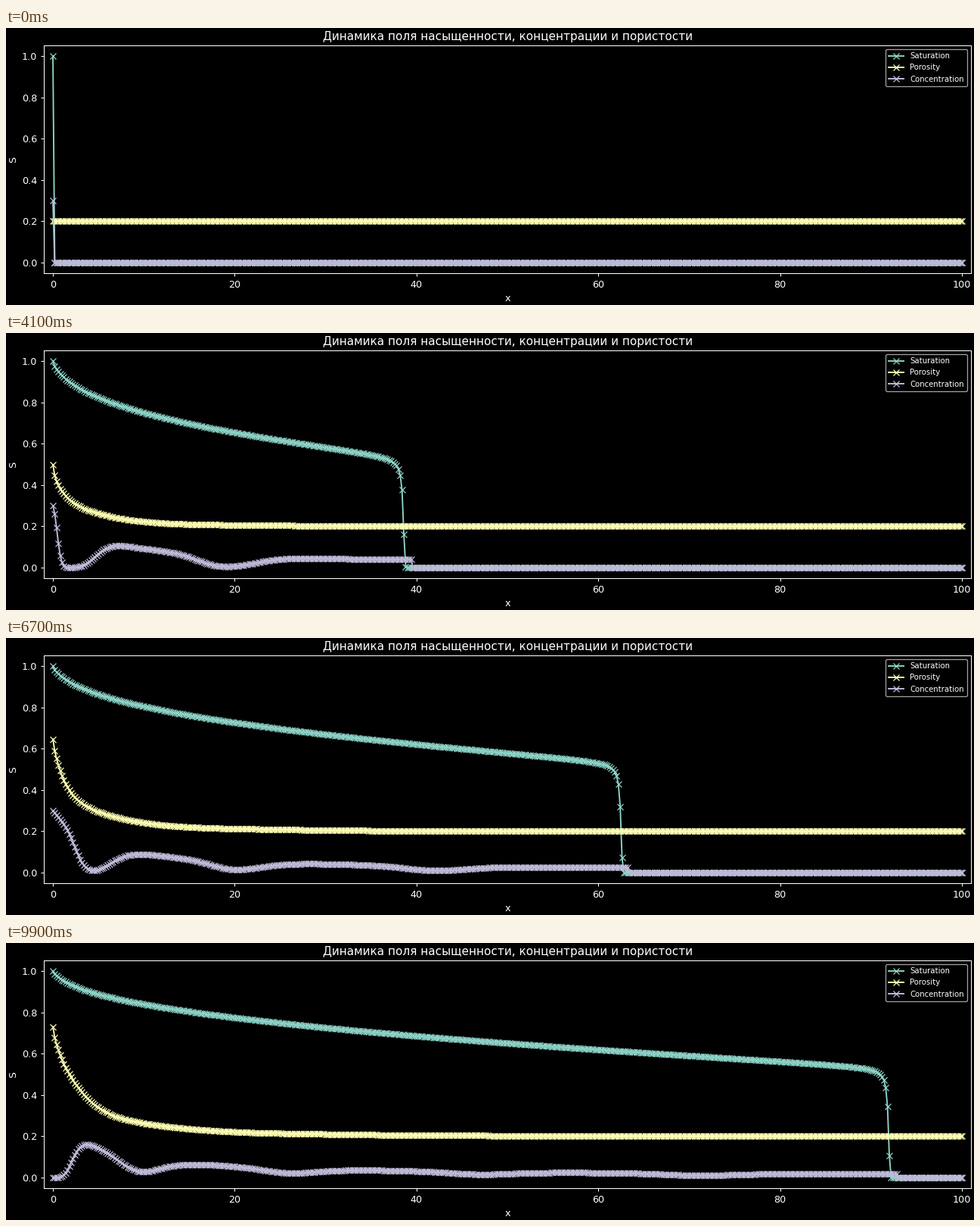
These frames come from a looping animation (1280x366 px, 10 s). A matplotlib script:

```python
import numpy as np
import matplotlib.pyplot as plt
from matplotlib.animation import FuncAnimation

WIDTH, HEIGHT = 1280, 366
DPI = WIDTH / 14
FRAMES, INTERVAL = 100, 100

# Two-phase flow with acid injected in pulses; time is measured in frames.
DX = 0.2
STEPS = 16             # time steps per frame
LEAD = 6               # steps already done when the first moving frame is shown
FLUX = 0.128           # total flow rate
MOBILITY = 0.4         # mobility ratio of the two phases
PULSE = 9.98           # length of an injection and of the pause after it
INLET = 0.3            # acid concentration while injecting
GROWTH = 0.2417        # pore growth rate
CONSUMPTION = 0.128    # acid consumption rate
DRY = 1e-60            # below this saturation a cell holds no acid

x = np.arange(501) * DX


def fractional_flow(s):
    return s**2 / (s**2 + MOBILITY * (1 - s)**2)


def advance(s, phi, c, step):
    """One explicit upwind step for saturation, porosity and concentration."""
    dt = 1 / STEPS
    c[0] = INLET if int(step * dt / PULSE) % 2 == 0 else 0.0
    flow = FLUX * fractional_flow(s)
    reaction = s * c**2 * (1 - phi)

    new_s = s.copy()
    new_s[1:] -= dt / DX * np.diff(flow) / phi[1:]
    new_phi = phi + dt * GROWTH * reaction

    acid = phi * s * c - dt * CONSUMPTION * reaction
    acid[1:] -= dt / DX * np.diff(flow * c)
    wet = new_s > DRY
    new_c = np.where(wet, acid / np.where(wet, new_phi * new_s, 1), 0)
    new_c[0] = c[0]
    return new_s, new_phi, np.clip(new_c, 0, INLET)


def simulate():
    s, c = np.zeros_like(x), np.zeros_like(x)
    phi = np.full_like(x, 0.2)
    s[0], c[0] = 1.0, INLET
    states = [(s, phi, c.copy())]
    for step in range(STEPS * (FRAMES - 1) + LEAD):
        s, phi, c = advance(s, phi, c, step)
        done = step + 1 - LEAD
        if done >= STEPS and done % STEPS == 0:
            states.append((s, phi, c.copy()))
    return states


states = simulate()

plt.style.use("dark_background")
plt.rcParams["font.family"] = "DejaVu Sans"
fig = plt.figure(figsize=(14, (HEIGHT + 0.0005) / DPI), dpi=DPI)
left, right, top, bottom = 50.0, 1276.2, 23.2, 323.8
ax = fig.add_axes([left / WIDTH, 1 - bottom / HEIGHT,
                   (right - left) / WIDTH, (bottom - top) / HEIGHT])
ax.set_xlim(-1, 101)
ax.set_ylim(-0.05, 1.05)
ax.set_title("Динамика поля насыщенности, концентрации и пористости")
ax.set_xlabel("x")
ax.set_ylabel("S")

lines = [ax.plot(x, y, marker="x", label=label)[0]
         for y, label in zip(states[0], ("Saturation", "Porosity", "Concentration"))]
ax.legend(loc="upper right", fontsize=8)


def update(frame):
    for line, y in zip(lines, states[frame]):
        line.set_ydata(y)
    return lines


anim = FuncAnimation(fig, update, frames=FRAMES, interval=INTERVAL, repeat=True)
plt.show()
```
